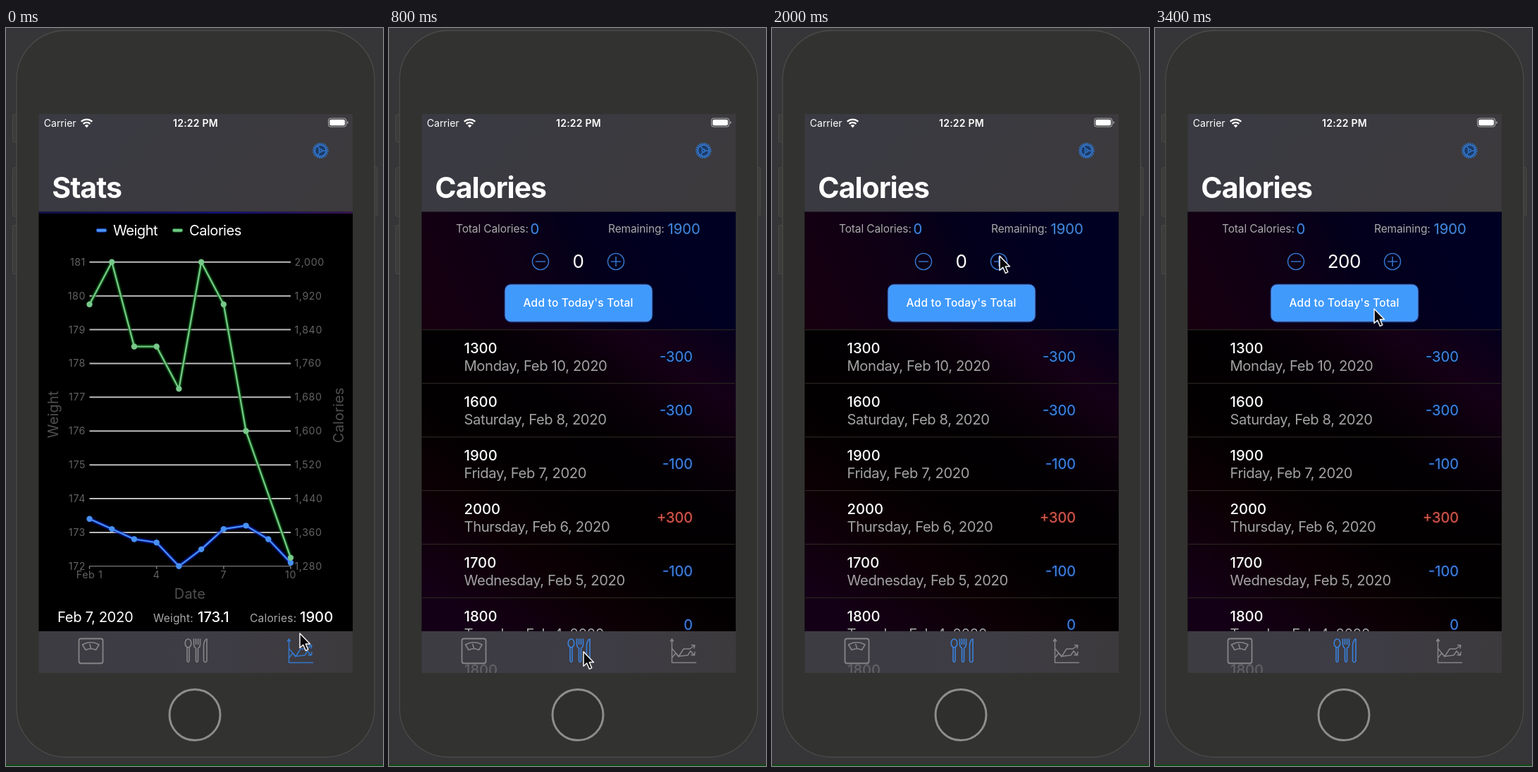
Animation of 535x1046 px, one loop 3500 ms. Source, as an HTML page:

```html
<!DOCTYPE html>
<html lang="en">
<head>
<meta charset="utf-8">
<title>Calorie tracker</title>
<style>
html, body { margin: 0; width: 100%; height: 100%; overflow: hidden; background: #353436; }
svg { display: block; width: 100vw; height: 100vh; }
text { font-family: Inter, sans-serif; font-size: 20.2px; letter-spacing: -.38px; fill: #fff; }
.title { font-size: 41px; font-weight: 700; letter-spacing: -1px; }
.status { font-size: 14px; letter-spacing: 0; }
.clock { font-weight: 600; letter-spacing: .25px; }
.axis { font-size: 14.2px; letter-spacing: .6px; fill: #626262; }
.name { font-size: 20px; letter-spacing: .15px; fill: #4e4e4e; }
.key { letter-spacing: -.55px; }
.small { font-size: 15.5px; letter-spacing: -.12px; fill: #a9a9ab; }
.sum { letter-spacing: .2px; }
.count { font-size: 26px; letter-spacing: -.6px; }
.button { font-size: 15.5px; font-weight: 500; letter-spacing: .22px; }
.bold { font-weight: 500; letter-spacing: 0; }
.date { fill: #a3a2a3; }
.blue, .red { letter-spacing: 0; paint-order: stroke; stroke-width: 3px; stroke-linejoin: round; }
.blue { fill: #4388e4; stroke: #020a26; }
.red { fill: #dc5f52; stroke: #240404; }
.end { text-anchor: end; }
.mid { text-anchor: middle; }
.line { fill: none; stroke-linejoin: round; stroke-linecap: round; }
</style>
</head>
<body>
<svg viewBox="0 0 535 1046" preserveAspectRatio="none">
  <defs>
    <linearGradient id="bar" x1="0" y1="0" x2="1" y2=".25">
      <stop offset="0" stop-color="#3a3a43"/><stop offset=".6" stop-color="#3b3a40"/><stop offset="1" stop-color="#3c3a3d"/>
    </linearGradient>
    <linearGradient id="tabs" x1="0" x2="1">
      <stop offset="0" stop-color="#3d3c43"/><stop offset=".6" stop-color="#3e3c44"/><stop offset="1" stop-color="#3d3a3d"/>
    </linearGradient>
    <linearGradient id="panel" gradientUnits="userSpaceOnUse" x1="80" y1="440" x2="400" y2="270">
      <stop offset="0" stop-color="#160010"/><stop offset=".4" stop-color="#0e0015"/><stop offset=".65" stop-color="#03001b"/><stop offset="1" stop-color="#000022"/>
    </linearGradient>
    <linearGradient id="list" gradientUnits="userSpaceOnUse" x1="490" y1="428" x2="170" y2="880">
      <stop offset="0" stop-color="#06001c"/><stop offset=".16" stop-color="#150016"/><stop offset=".3" stop-color="#090008"/>
      <stop offset=".42" stop-color="#020002"/><stop offset=".62" stop-color="#030001"/><stop offset=".78" stop-color="#0c0004"/><stop offset="1" stop-color="#140016"/>
    </linearGradient>
    <linearGradient id="edge" x1="0" x2="1">
      <stop offset="0" stop-color="#10104a"/><stop offset=".6" stop-color="#14127a"/><stop offset="1" stop-color="#3a1450"/>
    </linearGradient>
    <clipPath id="screen"><rect x="46.5" y="260.5" width="445.5" height="594.5"/></clipPath>
    <clipPath id="foot"><rect x="46.5" y="855" width="445.5" height="59"/></clipPath>
  </defs>

  <rect width="535" height="1046" fill="#363537"/>
  <rect y="1044" width="535" height="2" fill="#0b4a14"/>
  <g fill="#3c3c3a" stroke="#4a4a48">
    <rect x="9.5" y="122.5" width="7" height="39" rx="2"/>
    <rect x="9.5" y="198" width="7" height="69" rx="2"/>
    <rect x="9.5" y="279.5" width="7" height="69" rx="2"/>
    <rect x="520" y="197.5" width="7" height="69" rx="2"/>
  </g>
  <rect x="15" y="3.5" width="508" height="1030" rx="70" fill="#323230" stroke="#4b4b49" stroke-width="1.3"/>
  <circle cx="268" cy="973.5" r="36" fill="#2f2f2d" stroke="#8d8d8b" stroke-width="3"/>

  <rect x="46.5" y="260" width="445.5" height="596" fill="#000"/>
  <g clip-path="url(#screen)">
    <g id="stats"></g>
    <g id="calories">
      <rect x="46.5" y="260" width="445.5" height="168" fill="url(#panel)"/>
      <rect x="46.5" y="428" width="445.5" height="428" fill="url(#list)"/>
      <text class="small" x="95" y="290">Total Calories:</text>
      <text class="blue" x="200.5" y="292">0</text>
      <text class="small" x="311" y="290">Remaining:</text>
      <text class="blue" x="395.5" y="292">1900</text>
      <g class="line" stroke="#3270c4" stroke-width="1.6">
        <g id="minus"><circle r="11.5"/><path d="M-6.5 0H6.5"/></g>
        <g id="plus"><circle r="11.5"/><path d="M-6.5 0H6.5M0-6.5V6.5"/></g>
      </g>
      <text id="count" class="count mid" x="268.3" y="340"></text>
      <rect x="163.5" y="362.5" width="211" height="55" rx="9.5" fill="#0a2a78"/>
      <rect x="165" y="364" width="208" height="51.8" rx="8" fill="#409afc" stroke="#628fd4"/>
      <text class="button mid" x="268.6" y="395">Add to Today's Total</text>
      <g id="rows"></g>
    </g>
  </g>

  <rect x="46.5" y="122" width="445.5" height="138.5" fill="url(#bar)"/>
  <rect id="rim" x="46.5" y="260.5" width="445.5" height="2.5" fill="url(#edge)"/>
  <text class="status" x="53.8" y="139.5">Carrier</text>
  <text class="status clock mid" x="269" y="139.5">12:22 PM</text>
  <path d="M106.7 132.6a11.5 11.5 0 0 1 15.6 0M109.6 135.8a7.2 7.2 0 0 1 9.8 0" fill="none" stroke="#fff" stroke-width="2.3"/>
  <path d="M114.5 141.2l-2.8-3a4.3 4.3 0 0 1 5.6 0z" fill="#fff"/>
  <rect x="457.6" y="128" width="25" height="12" rx="3.5" fill="none" stroke="#a5a5a8" stroke-width="1.1"/>
  <rect x="459.3" y="129.7" width="21.6" height="8.6" rx="2" fill="#fff"/>
  <path d="M484 132v4q1.8-.6 1.8-2t-1.8-2z" fill="#a5a5a8"/>
  <g fill="none" stroke="#2f70c2" transform="translate(446.3 173.8)">
    <circle r="10.2" stroke-width="2.2" stroke-dasharray="2 1.2"/>
    <circle r="8.2" stroke-width="2.2" fill="#1d3a66"/>
    <circle r="2" stroke-width="1.7"/>
    <path d="M2 0H8M-1-1.8L-4-7M-1 1.8L-4 7" stroke-width="1.7"/>
  </g>
  <text id="title" class="title" x="65.3" y="240.5"></text>

  <rect x="46.5" y="855" width="445.5" height="59" fill="url(#tabs)"/>
  <g id="ghost" clip-path="url(#foot)"><text class="bold" x="107" y="916.5" style="fill:#626165">1800</text></g>
  <g class="line" stroke="#868588" stroke-width="1.8">
    <rect x="103.5" y="865.5" width="34" height="35" rx="3"/>
    <path d="M108.5 874q12-6.5 23.5 0l-4.5 7.5q-7-3.5-14.5 0zM120.5 879l-1.7-5.5" stroke-width="1.6"/>
  </g>
  <g id="fork" class="line" stroke-width="1.6">
    <ellipse cx="258.5" cy="872" rx="4.3" ry="6"/>
    <path d="M257 878v19q1.500 3.500 3 0V878"/>
    <path d="M266.500 866v8q.5 4 3 5v18q1.500 3.500 3 0V879q2.500-1 3-5v-8M269.500 866v7.500M272.500 866v7.500"/>
    <path d="M280.500 897V874q1-7 4.500-8v31q-2.500 4-4.500 0z"/>
  </g>
  <g id="graph" class="line" stroke-width="1.5">
    <path d="M401.500 866V899.500H435.500M399.500 869l2-3 2 3"/>
    <path d="M402 880l9 11 7-11h9l6.500-5M429.500 874.500l4.500 .5-1 4"/>
    <path d="M402 892l5-6 4 4.500 13-1.500 4-6 5 6M429 888.500l4.500.5.5-4.500"/>
  </g>
  <path id="cursor" d="M0 0V20.500L4.700 16.300l3.600 8.200 3.500-1.600L8.300 15h6.200z" fill="#08080a" stroke="#f4f4f4" stroke-width="1.500" stroke-linejoin="round"/>
</svg>
<script>
const LOOP = 3500, STEP = 100, SWITCH = 800;
const $ = id => document.getElementById(id);
const text = (cls, x, y, s, more = '') => `<text class="${cls}" x="${x}" y="${y}" ${more}>${s}</text>`;

// Chart
const left = 118.5, right = 404, top0 = 328, tall = 431;
const dayX = day => left + (day - 1) * (right - left) / 9;
const weightY = w => top0 + (181 - w) / 9 * tall;
const calY = c => top0 + (2000 - c) / 720 * tall;

function series(points, color, glow) {
  const path = 'M' + points.map(p => p.join(' ')).join('L');
  const dots = points.map(([x, y]) => `<circle cx="${x}" cy="${y}" r="4.2" fill="${color}"/>`).join('');
  const stroke = (c, w, o) => `<path class="line" d="${path}" stroke="${c}" stroke-width="${w}" opacity="${o}"/>`;
  return stroke(glow, 7, .3) + stroke(glow, 4.5, .6) + stroke(color, 2.2, 1) + dots;
}

function chart() {
  let s = '';
  const legend = [[128, '#4a94f4', '#0a2a90', 'Weight'], [236, '#70c883', '#0c4a16', 'Calories']];
  for (const [x, color, glow, label] of legend) {
    s += `<rect x="${x}" y="280.5" width="15" height="5" rx="2.5" fill="${color}" stroke="${glow}"/>`;
    s += text('key', x + 24, 290, label);
  }
  for (let i = 0; i < 10; i++) {
    const y = top0 + i * tall / 9;
    s += `<path d="M${left} ${y}H${right}" stroke="${i < 9 ? '#bcbcbc' : '#666'}" stroke-width="${i < 9 ? 2 : 1.5}"/>`;
    s += text('axis end', 113, y + 5, 181 - i);
    s += text('axis', 409.5, y + 5, (2000 - 80 * i).toLocaleString('en-US'));
  }
  for (const day of [1, 4, 7, 10]) {
    s += `<path d="M${dayX(day)} 759v4" stroke="#777" stroke-width="1.5"/>`;
    s += text('axis mid', dayX(day), 776, day === 1 ? 'Feb 1' : day);
  }
  s += text('name mid', 261, 805, 'Date');
  s += text('name mid', 0, 0, 'Weight', 'transform="translate(74 544) rotate(-90)"');
  s += text('name mid', 0, 0, 'Calories', 'transform="translate(479 545) rotate(-90)"');

  const weights = [173.4, 173.1, 172.8, 172.7, 172, 172.5, 173.1, 173.2, 172.8, 172.1];
  const cals = [1900, 2000, 1800, 1800, 1700, 2000, 1900, 1600, null, 1300];
  s += series(weights.map((w, i) => [dayX(i + 1), weightY(w)]), '#4790f2', '#0820c0');
  s += series(cals.map((c, i) => [dayX(i + 1), c && calY(c)]).filter(p => p[1]), '#78c88a', '#0a6a1a');

  s += text('', 73, 838.5, 'Feb 7, 2020');
  s += text('small sum', 209, 838.5, 'Weight:') + text('bold', 272, 838.5, '173.1');
  s += text('small sum', 346, 838.5, 'Calories:') + text('bold', 417, 838.5, '1900');
  return s;
}

function rows() {
  const days = [
    [1300, 'Monday, Feb 10', '-300'], [1600, 'Saturday, Feb 8', '-300'], [1900, 'Friday, Feb 7', '-100'],
    [2000, 'Thursday, Feb 6', '+300'], [1700, 'Wednesday, Feb 5', '-100'], [1800, 'Tuesday, Feb 4', '0']
  ];
  return days.map(([total, day, diff], i) => {
    const y = 428 + i * 76;
    return `<path d="M47 ${y - .3}H491" stroke="#29231f" stroke-width="1.3"/>` +
      text('bold', 106.5, y + 33, total) + text('date', 106.5, y + 58, day + ', 2020') +
      text((diff[0] === '+' ? 'red' : 'blue') + ' end', 431, y + 45.3, diff);
  }).join('');
}

// Pointer stops: time, x, y
const stops = [
  [0, 417, 858], [200, 343, 883], [400, 276, 884], [900, 276, 884], [1500, 301, 421],
  [1900, 323, 323], [2700, 323, 323], [3200, 311, 398], [3500, 311, 398]
];
function pointer(t) {
  const i = stops.findIndex(p => p[0] > t);
  const [t0, x0, y0] = stops[i - 1], [t1, x1, y1] = stops[i];
  const k = (t - t0) / (t1 - t0);
  const e = t0 < 400 ? k : k * k * (3 - 2 * k);
  return `translate(${x0 + (x1 - x0) * e} ${y0 + (y1 - y0) * e})`;
}

const show = (id, on) => $(id).setAttribute('display', on ? 'inline' : 'none');
const move = (id, tr) => $(id).setAttribute('transform', tr);

function draw(now) {
  const t = Math.floor(now % LOOP / STEP) * STEP;
  const stats = t < SWITCH;
  show('stats', stats);
  show('calories', !stats);
  show('ghost', !stats);
  show('rim', t < STEP);
  $('title').textContent = stats ? 'Stats' : 'Calories';
  $('graph').setAttribute('stroke', stats ? '#3478cc' : '#868588');
  $('fork').setAttribute('stroke', stats ? '#868588' : '#3a82dc');
  move('stats', `translate(0 ${3.8 * Math.exp(-t / 95)})`);

  const n = t < 2200 ? 0 : t < 2600 ? 100 : 200;
  const gap = { 0: 53.5, 100: 67.5, 200: 68.5 }[n];
  $('count').textContent = n;
  move('minus', `translate(${268.5 - gap} 331)`);
  move('plus', `translate(${268.5 + gap} 331)`);
  move('cursor', pointer(t));
}

$('stats').innerHTML = chart();
$('rows').innerHTML = rows();
const start = performance.now();
function tick() {
  draw(performance.now() - start);
  requestAnimationFrame(tick);
}
tick();
</script>
</body>
</html>
```
